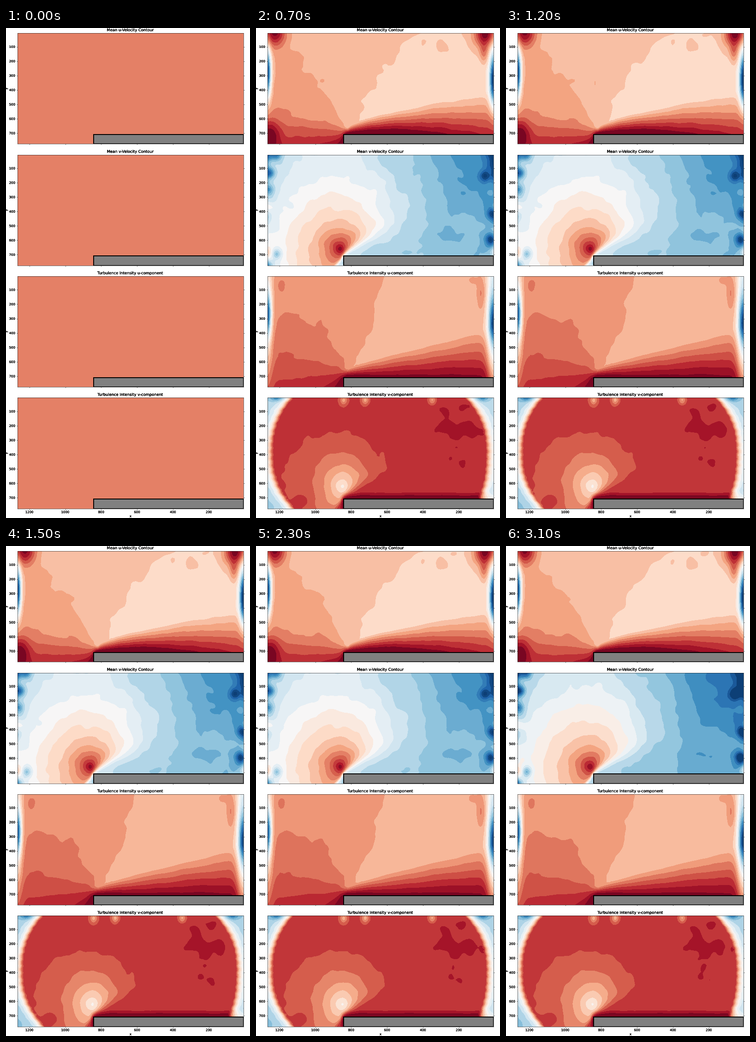
Animation of 529x1058 px, one loop 3200 ms. Source, as a matplotlib script:

```python
import numpy as np
import matplotlib.pyplot as plt
from matplotlib.animation import FuncAnimation
from matplotlib.patches import Rectangle
from matplotlib.patheffects import Normal

W, H, DPI = 529, 1058, 50
LEFT, RIGHT, TOP, PITCH, HEIGHT = 25, 515, 11.2, 262.4, 239.2
PLATE_X, PLATE_Y = 189.7, 218.5
FRAMES, INTERVAL = 32, 100
LEVELS = np.arange(-16, 13)

xs = np.linspace(LEFT, RIGHT, 141)
ys = np.linspace(0, HEIGHT, 70)
X, Y = np.meshgrid(xs, ys)
cmap = plt.get_cmap("RdBu_r")
rng = np.random.default_rng(11)


def sig(t):
    return 1 / (1 + np.exp(-np.clip(t, -40, 40)))


def blob(x, y, height, sx, sy):
    return height * np.exp(-((X - x) / sx) ** 2 - ((Y - y) / sy) ** 2)


def radius(cx, cy, right):
    """Distance from a centre, with the right side squeezed."""
    dx = X - cx
    return np.hypot(np.where(dx < 0, dx, dx / right), Y - cy)


def noise(sigma):
    """Smooth random field with unit deviation."""
    ny, nx = X.shape
    ky, kx = np.fft.fftfreq(ny)[:, None], np.fft.rfftfreq(nx)[None]
    f = np.fft.rfft2(rng.standard_normal((ny, nx)))
    z = np.fft.irfft2(f * np.exp(-2 * (np.pi * sigma) ** 2 * (kx**2 + ky**2)), (ny, nx))
    return z / z.std()


def speckle():
    return 0.75 * noise(4) + 0.45 * noise(1.6)


side = np.exp(-np.minimum(X - LEFT, RIGHT - X) / 12)
# distance along the plate and along the approach, both 0 to 1
along = np.clip((X - 200) / 290, 0, 1.1)
ahead = np.clip((X - 40) / 145, 0, 1)
# line where the flow separates from the leading corner
run = X - 184
shear = 226 - 3.45 * np.maximum(run, 0) ** 0.62 - 1.2 * np.minimum(run, 0)
below = sig((Y - shear) / np.interp(X, [190, 330], [3, 15]))


def step_flow(y2, y3, gap, top, wall, bands, edge):
    """Bands before the step, boundary layer above it, pale core on the right."""
    front = np.where(Y < y2, 2 + (Y - y2) / (y2 + 60), 2 + (Y - y2) / (y3 - y2))
    front = np.where(Y > y3, 3 + (Y - y3) / gap, front)
    layer = np.maximum(1 + (bands - 1) * (Y - top) / (wall - top), 0.3)
    w = sig((X - 193) / 3)
    f = (1 - w) * front + w * layer
    return np.clip(np.maximum(f, np.clip(1 + (edge - X) / 60, 0.38, 1.4)), 0, bands + 0.9)


def mean_u():
    f = step_flow(62 + 126 * np.clip((X - 80) / 105, 0, 1) ** 1.6,
                  178 + 26 * ahead**2, 24 - 16 * ahead**2,
                  204 - 65 * along**0.65, 214 - 40 * along + 60 * along**2, 7,
                  345 - 125 * (Y / 190) ** 0.7)
    f += blob(410, 20, 0.45, 90, 45) * (1 + 0.5 * noise(2.5))
    f += blob(193, 108, 0.6, 5, 14) + blob(193, 172, 0.5, 5, 26)
    f += blob(25, 86, -13, 8, 52) + blob(515, 100, -12, 9, 58)
    for x, y, h in (40, -2, 6), (497, -2, 7), (28, 218, 3.4):
        f += blob(x, y, h, 23, 30)
    return f + blob(494, 42, 2.4, 9, 24)


def mean_v():
    ring = 4.1 * np.log(150 / (radius(183, 203, 0.8) + 14))
    f = (1 - below) * ring - 2.5 * below
    f -= 0.9 * sig((X - 260) / 22) + 0.9 * sig((X - 388) / 24)
    f += side * (1.6 * noise(2.5) - 1)
    for x, y in (45, 0), (31, 40), (27, 75), (45, 214), (497, 45), (512, 126), (508, 182):
        f += blob(x, y, -4, 11, 12)
    return f + blob(420, 175, -0.5, 40, 16)


def turb_u():
    f = step_flow(80 + 88 * ahead**2, 173 + 31 * ahead**2, 50 - 44 * ahead**2,
                  200 - 74 * along**0.85, 213, 6, 278 - 62 * (Y / 190) ** 1.3)
    f += blob(193, 170, 0.5, 5, 22) + blob(55, 20, 0.6, 12, 18)
    f += blob(25, 82, -9, 8, 45) + blob(25, 90, -4.5, 11, 130)
    f += blob(515, 98, -6, 10, 45) + blob(515, 120, -7, 14, 170)
    return f + blob(470, 10, 0.9, 14, 12) + blob(489, 38, 1.9, 10, 36)


def turb_v():
    f = 0.66 - 6.2 * np.exp(-radius(188, 191, 0.8) / 55) * (1 - below)
    for y in 207, 213:
        f += 1.2 * sig((Y - y) / 1.5) * sig((X - 187) / 2)
    u = (Y - 118) / 120
    bend = np.abs(u) ** 2.4
    ripple = 0.8 * np.sin(0.42 * Y)
    for gap in (37 + 46 * bend + ripple - X,
                X - 498 + np.where(u < 0, 48, 26) * bend + ripple):
        f -= 9.5 * (1 - np.exp(-np.maximum(gap, 0) / 12))
    for x in 190, 237, 382:
        f += blob(x, 5, -3, 9, 11)
    for x in 45, 490:
        f += blob(x, 0, -3.5, 15, 8)
    f += blob(98, 222, 0.9, 16, 13)
    return f + blob(430, 80, 0.3, 75, 70) * (1 + 0.6 * noise(2.5))


# title, field, still noise, fluctuation, first colour and band step by stage
PANELS = [
    ("Mean u-Velocity Contour", mean_u(), 0.06, 0.25,
     (0.575, 0.605, 0.595, 0.595), (0.05, 0.0526, 0.054, 0.054)),
    ("Mean v-Velocity Contour", mean_v(), 0.12, 0.35,
     (0.5, 0.5, 0.5, 0.475), (0.06, 0.05, 0.05, 0.057)),
    ("Turbulence Intensity u-component", turb_u(), 0.05, 0.14,
     (0.675, 0.664, 0.667, 0.66), (0.05, 0.052, 0.052, 0.053)),
    ("Turbulence Intensity v-component", turb_v(), 0.08, 0.22,
     (0.865, 0.865, 0.858, 0.858), (0.055, 0.055, 0.057, 0.057)),
]
STAGES = [6, 12, 29]
COLD = [1.28, 1, 1, 1.2]  # gain of negative v


def running(field, still, wobble):
    """Field plus the running mean of random fluctuations, for every frame."""
    steady = field + still * speckle()
    total, out = 0, [steady]
    for n in range(1, FRAMES):
        total = total + speckle()
        out.append(steady + wobble * total / n)
    return out


series = [running(*p[1:4]) for p in PANELS]

plt.rcParams["font.family"] = "DejaVu Sans"
fig = plt.figure(figsize=(W / DPI, H / DPI), dpi=DPI, facecolor="white")
heavy = [Normal()] * 3
axes = []
for i, panel in enumerate(PANELS):
    bottom = H - TOP - PITCH * i - HEIGHT
    ax = fig.add_axes([LEFT / W, bottom / H, (RIGHT - LEFT) / W, HEIGHT / H])
    ax.set_xlim(LEFT, RIGHT)
    ax.set_ylim(HEIGHT, 0)
    ax.autoscale(False)
    xt, yt = range(200, 1201, 200), range(100, 701, 100)
    last = i == len(PANELS) - 1
    ax.set_xticks([517.6 - 0.389 * v for v in xt], [str(v) if last else "" for v in xt])
    ax.set_yticks([0.311 * v - 1.8 for v in yt], [str(v) for v in yt])
    ax.tick_params(right=True)
    texts = [ax.set_title(panel[0]), ax.set_ylabel("y")]
    if last:
        texts.append(ax.set_xlabel("x"))
    for t in texts + ax.get_xticklabels() + ax.get_yticklabels():
        t.set_path_effects(heavy)
    ax.add_patch(Rectangle((PLATE_X, PLATE_Y), RIGHT - PLATE_X, HEIGHT - PLATE_Y,
                           fc="gray", ec="black", lw=2.8, zorder=2.2))
    axes.append(ax)

drawn = []


def update(n):
    while drawn:
        drawn.pop().remove()
    stage = int(np.searchsorted(STAGES, n, side="right"))
    for i, ax in enumerate(axes):
        if n == 0:
            drawn.append(ax.add_patch(Rectangle(
                (LEFT, 0), RIGHT - LEFT, HEIGHT, fc=cmap(0.75), lw=0, zorder=1)))
            continue
        base, step = (p[stage] for p in PANELS[i][4:])
        z = series[i][n]
        if i == 1:
            z = np.where(z < 0, COLD[stage] * z, z)
            z = (0.5 + 0.05 * z - base) / step + 0.5
        colors = cmap(np.clip(base + step * LEVELS[:-1], 0.03, 0.975))
        z = np.clip(z, LEVELS[0] + 0.01, LEVELS[-1] - 0.01)
        drawn.append(ax.contourf(X, Y, z, levels=LEVELS, colors=colors, zorder=1))


anim = FuncAnimation(fig, update, frames=FRAMES, interval=INTERVAL,
                     repeat=True, repeat_delay=0)
plt.show()
```
